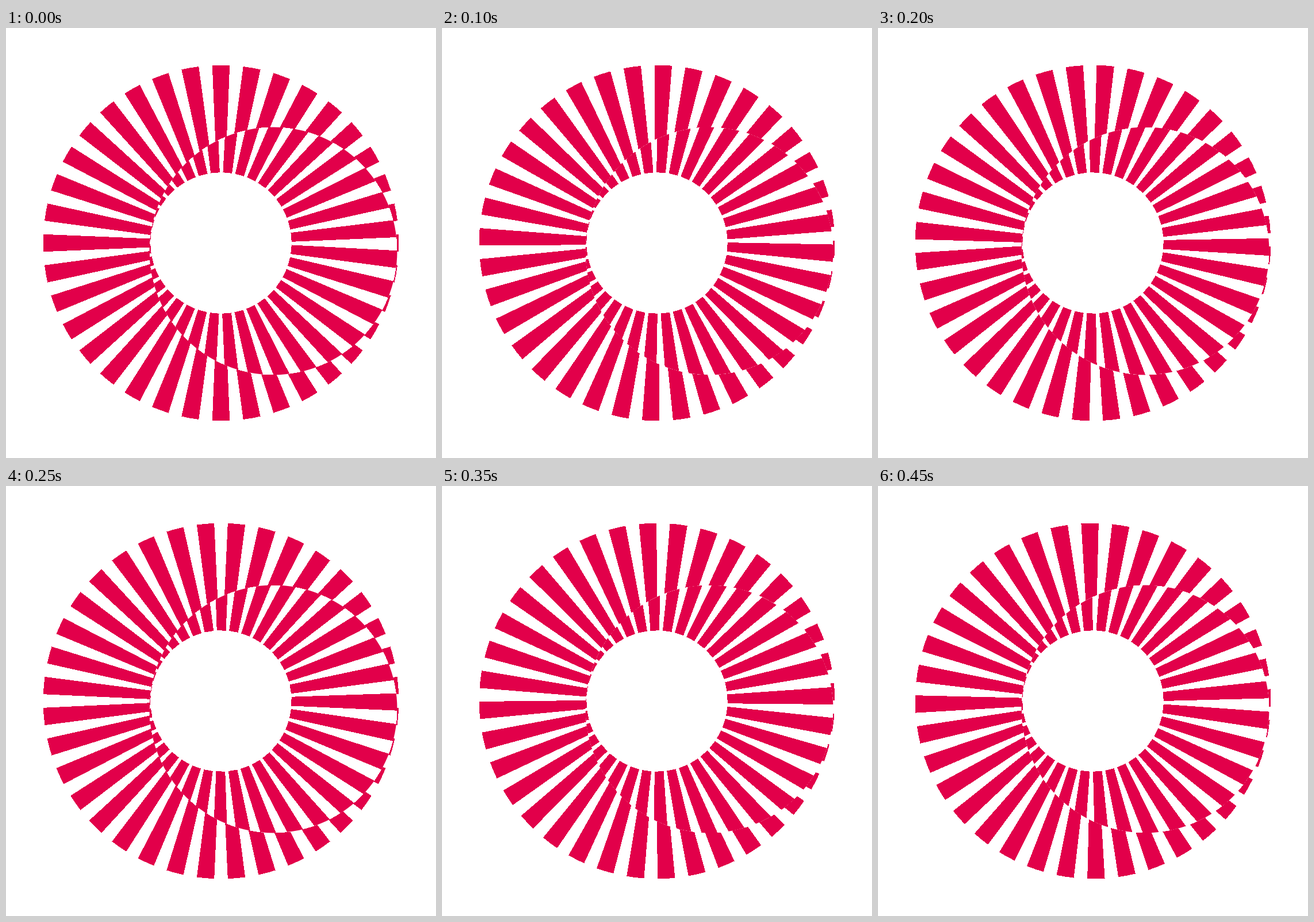
Write an HTML page that moves like this. It is 748x748 px and loops after 500 ms.

```html
<!DOCTYPE html>
<html lang="en">
<head>
<meta charset="utf-8">
<title>Counter-rotating spokes</title>
<style>
  html, body { margin: 0; width: 100%; height: 100%; overflow: hidden; background: #fff; }
  svg { display: block; width: 100vw; height: 100vh; }
</style>
</head>
<body>
<svg viewBox="0 0 748 748" shape-rendering="crispEdges">
  <defs>
    <clipPath id="lens"><circle cx="465" cy="388" r="215.5"/></clipPath>
  </defs>
  <rect width="748" height="748" fill="#fff"/>
  <path id="outer" fill="#e2004a"/>
  <circle cx="465" cy="388" r="215.5" fill="#fff"/>
  <g clip-path="url(#lens)"><path id="inner" fill="#e2004a"/></g>
</svg>
<script>
  const C = 374, COUNT = 36, LOOP = 500, STEP = 50;
  const NEAR = 122.5, FAR = 309, FAR_HALF = 15.2;
  const LENS_PHASE = 5.3;

  const outer = document.getElementById('outer');
  const inner = document.getElementById('inner');

  // One tapered spoke per 10 degrees, drawn around the stage centre.
  function spokes(nearHalf) {
    let d = '';
    for (let i = 0; i < COUNT; i++) {
      const a = i * 2 * Math.PI / COUNT, cos = Math.cos(a), sin = Math.sin(a);
      const at = (r, s) =>
        (C + r * cos - s * sin).toFixed(2) + ' ' + (C + r * sin + s * cos).toFixed(2);
      d += `M${at(NEAR, -nearHalf)}L${at(FAR, -FAR_HALF)}` +
           `A${FAR} ${FAR} 0 0 1 ${at(FAR, FAR_HALF)}` +
           `L${at(NEAR, nearHalf)}Z`;
    }
    return d;
  }

  function turn(el, deg) {
    el.setAttribute('transform', `rotate(${deg} ${C} ${C})`);
  }

  function draw(ms) {
    const deg = Math.floor((ms % LOOP) / STEP);
    turn(outer, deg);
    turn(inner, LENS_PHASE - deg);
  }

  outer.setAttribute('d', spokes(7.5));
  inner.setAttribute('d', spokes(7.9));

  const start = performance.now();
  function tick() {
    draw(performance.now() - start);
    requestAnimationFrame(tick);
  }
  draw(0);
  requestAnimationFrame(tick);
</script>
</body>
</html>
```
